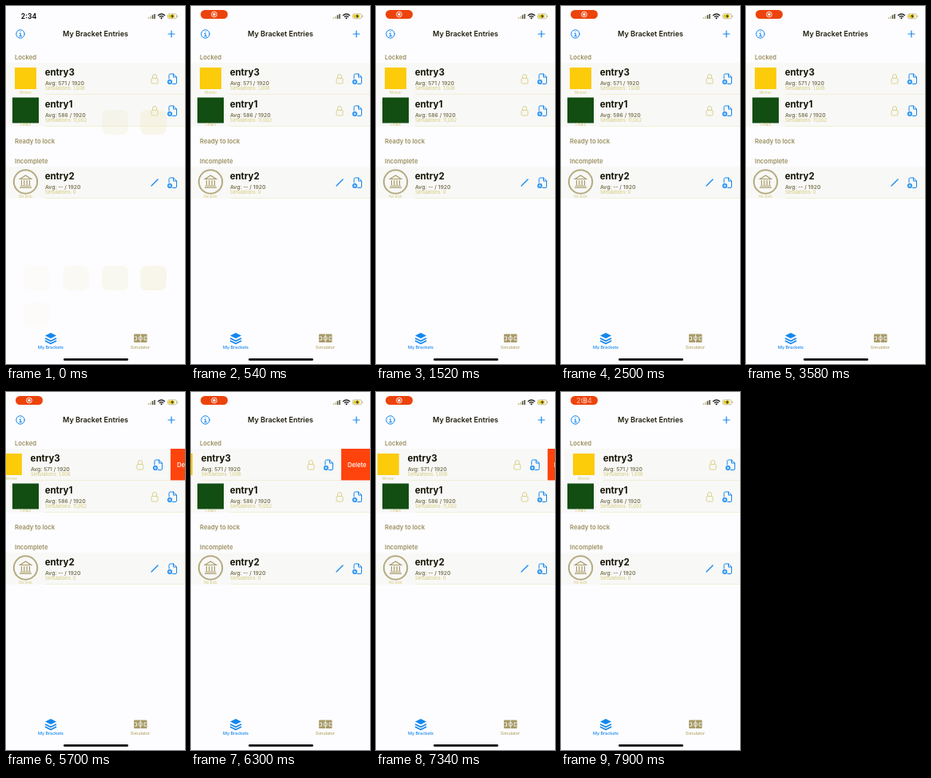
These frames come from a looping animation (224x448 px, 8000 ms). An HTML page:

```html
<!DOCTYPE html>
<html lang="en">
<head>
<meta charset="utf-8">
<title>Bracket Entries</title>
<style>
  html, body { margin: 0; width: 100%; height: 100%; overflow: hidden; background: #fdfdff; }
  svg { display: block; width: 100%; height: 100%; }
  text { font-family: Inter, Roboto, sans-serif; }
  .title { font-size: 9px; font-weight: 600; text-anchor: middle; fill: #1c1a08; }
  .section { font-size: 7.7px; font-weight: 600; fill: #9b8f60; }
  .name { font-size: 11.400px; font-weight: 700; fill: #151304; }
  .avg { font-size: 6.8px; font-weight: 500; fill: #6d663f; }
  .sims { font-size: 5.8px; fill: #d2c874; }
  .pick { font-size: 4.6px; fill: #d2c874; text-anchor: middle; }
  .tab { font-size: 5.4px; font-weight: 500; text-anchor: middle; }
  .clock { font-size: 8.6px; font-weight: 600; text-anchor: middle; }
  .blue { fill: none; stroke: #1487ee; stroke-linecap: round; stroke-linejoin: round; }
  .khaki { fill: none; stroke: #a89b68; }
  .lock { fill: none; stroke: #d8cd80; stroke-width: .9; }
</style>
</head>
<body>
<svg viewBox="0 0 224 448">
  <defs>
    <g id="doc" class="blue">
      <path d="M204 91v-4.500q0-1.500 1.500-1.500h4l4 4v7q0 1.500-1.500 1.500h-3.500M209.500 85v4h4"/>
      <circle cx="205" cy="95" r="3" fill="#1487ee" stroke="none"/>
      <path d="M203.500 95h3M205 93.500v3" stroke="#fff" stroke-width=".8"/>
    </g>
    <g id="lock" class="lock">
      <rect x="182" y="90.500" width="8" height="6.500" rx="1.200"/>
      <path d="M183.500 90.500v-2.500a2.500 2.500 0 0 1 5 0v2.500"/>
    </g>
    <path id="pencil" class="blue" stroke-width="1.300" d="M182 95l8-8"/>
    <g id="bank" class="khaki">
      <circle cx="24.500" cy="90" r="14.700" stroke="#b5ab80" stroke-width="2"/>
      <path d="M17.500 86.500l7-4.500 7 4.500zM19.500 88v6M22.800 88v6M26.200 88v6M29.500 88v6M18 95h13M17 97.200h15" stroke-width="1.200"/>
    </g>
    <rect id="gold" x="11" y="77" width="27" height="27" fill="#fccb0a"/>
    <rect id="green" x="8" y="74.500" width="33" height="32" fill="#124d12"/>
  </defs>

  <rect width="224" height="448" fill="#fdfdff"/>

  <text class="title" x="112" y="38.300">My Bracket Entries</text>
  <g class="blue">
    <circle cx="18" cy="35" r="5.200"/>
    <path d="M17 34.500h1.200v3M16.800 37.700h2.800M18 32.300v.1" stroke-width="1.100"/>
    <path d="M203 35h8M207 31v8" stroke-width="1.200"/>
  </g>

  <text class="section" x="11" y="67">Locked</text>
  <text class="section" x="11" y="172">Ready to lock</text>
  <text class="section" x="11" y="197">Incomplete</text>
  <g id="rows"></g>
  <g id="ghosts" fill="#efe9bd"></g>
  <g id="delete">
    <rect y="71" width="224" height="39.500" fill="#ff430d"/>
    <text x="8" y="93.500" font-size="7.700" font-weight="500" fill="#fff">Delete</text>
  </g>

  <g fill="#1487ee">
    <path d="M49 412.500l7-3.500 7 3.500-7 3.500z"/>
    <path class="blue" d="M49.500 416l6.500 3.200 6.500-3.200M49.500 419.200l6.500 3.300 6.500-3.300" stroke-width="1.600"/>
    <text class="tab" x="56" y="429">My Brackets</text>
  </g>
  <rect x="160" y="410.500" width="16.500" height="10.500" rx="1" fill="#a89b68"/>
  <g fill="none" stroke="#fdfdff" stroke-width=".8">
    <path d="M168.300 411v10M160.500 414h3v4h-3M176 414h-3v4h3"/>
    <circle cx="168.300" cy="415.800" r="2.200"/>
  </g>
  <text class="tab" x="168" y="429" fill="#b3a768">Simulator</text>
  <rect x="72" y="441" width="81" height="2.800" rx="1.400"/>

  <path d="M178.500 16v-2M181 16v-3.200" stroke="#c9c39a" stroke-width="1.600"/>
  <path d="M183.500 16v-4.800M186 16v-6" stroke="#55513a" stroke-width="1.600"/>
  <path d="M190 12q4.500-4 9 0M191.800 13.800q2.700-2.400 5.400 0" fill="none" stroke="#222" stroke-width="1.300"/>
  <circle cx="194.500" cy="15.300" r="1"/>
  <rect x="202.500" y="9.800" width="11" height="6" rx="1.700" fill="none" stroke="#b9b48a" stroke-width=".8"/>
  <rect x="203.500" y="10.800" width="7.500" height="4" rx=".8" fill="#e8cb10"/>
  <path d="M214.700 11.800v2" stroke="#b9b48a"/>
  <path d="M208.600 9.700l-2.300 3.500h1.700l-.6 2.800 2.500-3.700h-1.700z" fill="#222"/>

  <text id="clock" class="clock" x="28.500" y="16">2:34</text>
  <g id="pill">
    <rect x="12" y="5" width="34" height="11" rx="5.500" fill="#ec430c"/>
    <g id="record">
      <circle cx="29" cy="10.500" r="3.400" fill="none" stroke="#fff" stroke-width=".9"/>
      <circle cx="29" cy="10.500" r="1.700" fill="#fff"/>
    </g>
    <text id="pillClock" class="clock" x="29" y="13.600" fill="#fff">2:34</text>
  </g>
</svg>
<script>
const LOOP = 8000;
const $ = id => document.getElementById(id);

const entries = [
  { y: 0, name: 'entry3', avg: '571', sims: '1,008', pick: 'Winner', badge: 'gold', action: 'lock' },
  { y: 40, name: 'entry1', avg: '586', sims: '11,002', pick: 'Finals', badge: 'green', action: 'lock' },
  { y: 130, name: 'entry2', avg: '--', sims: '0', pick: 'No pick', badge: 'bank', action: 'pencil' }
];

$('rows').innerHTML = entries.map(e => `
  <g id="${e.name}"><g transform="translate(0 ${e.y})">
    <rect y="71" width="224" height="40" fill="#f8f8f7"/>
    <path d="M49 110.500h175" stroke="#ece7c0" stroke-width=".6"/>
    <use href="#${e.badge}"/>
    <text class="pick" x="24.500" y="110">${e.pick}</text>
    <text class="name" x="48.700" y="87">${e.name}</text>
    <text class="avg" x="49" y="98.800">Avg: ${e.avg} / 1920</text>
    <text class="sims" x="49" y="105.300">Simulations: ${e.sims}</text>
    <use href="#${e.action}"/><use href="#doc"/>
  </g></g>`).join('');

// Fading home screen icons, fainter towards the left
$('ghosts').innerHTML = [[22, 325], [71, 325], [120, 325], [168, 325], [22, 371], [120, 130], [168, 130]]
  .map(([x, y]) => `<rect x="${x}" y="${y}" width="33" height="31" rx="8" opacity="${.1 + x / 240}"/>`).join('');

// Eased progress from 0 to 1 between two times
function ramp(t, start, end) {
  const p = Math.min(1, Math.max(0, (t - start) / (end - start)));
  return p * p * (3 - 2 * p);
}

function draw(t) {
  const swipe = -36 * (ramp(t, 5400, 6000) - ramp(t, 6900, 7560)) + 4 * ramp(t, 7700, 7900);
  $('entry3').setAttribute('transform', `translate(${swipe} 0)`);
  $('delete').setAttribute('transform', `translate(${224 + Math.min(0, swipe)} 0)`);

  const pill = ramp(t, 60, 450);
  const showTime = ramp(t, 7760, 8040);
  $('pill').setAttribute('opacity', pill);
  $('clock').setAttribute('opacity', 1 - pill);
  $('record').setAttribute('opacity', 1 - showTime);
  $('pillClock').setAttribute('opacity', showTime);
  $('ghosts').setAttribute('opacity', .4 * (1 - ramp(t, 0, 500)));
}

function tick() {
  draw(performance.now() % LOOP);
  requestAnimationFrame(tick);
}
tick();
</script>
</body>
</html>
```
